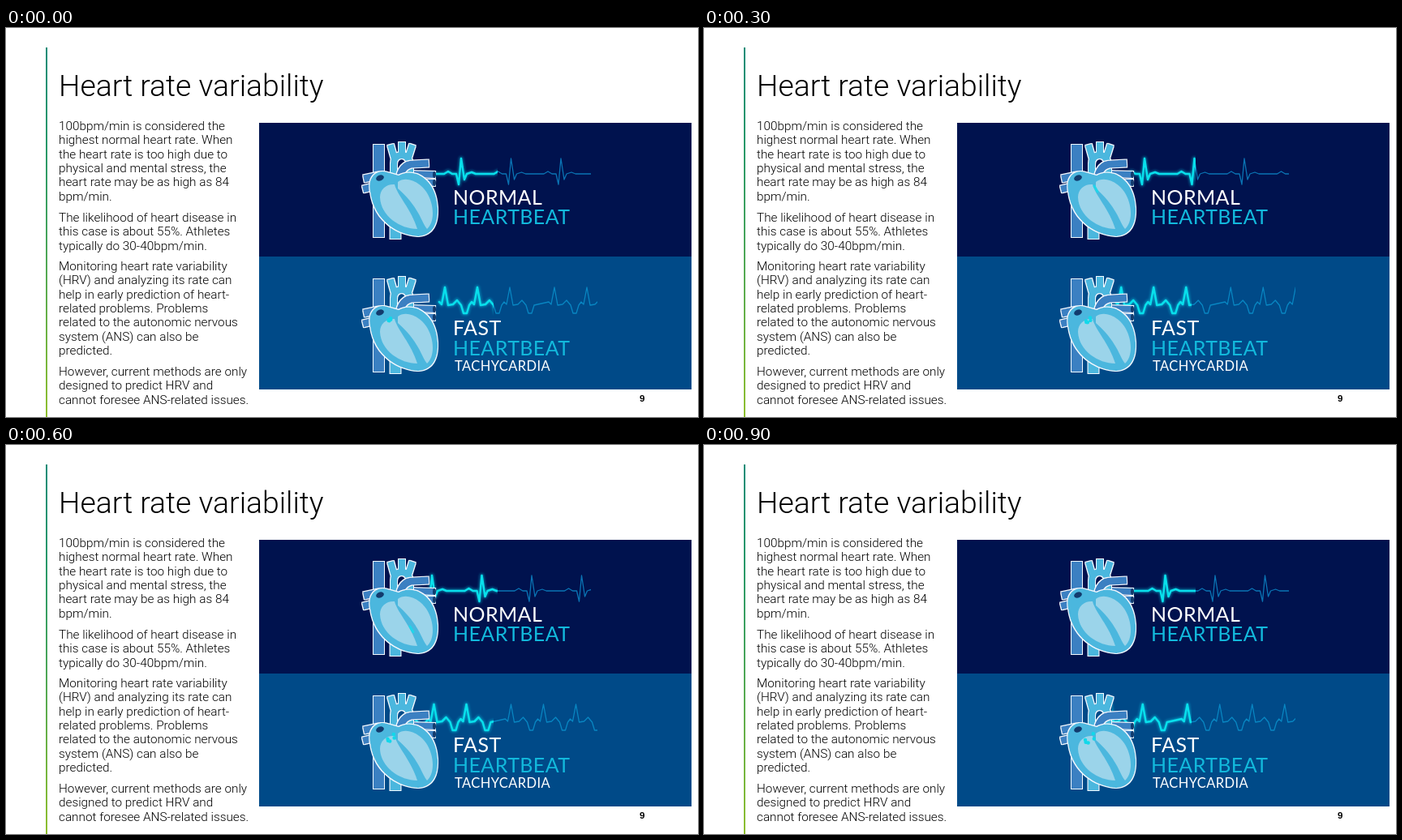
Recreate the animation shown at these times as an HTML page. Size 853 by 480 pixels, loop 960 ms.

```html
<!DOCTYPE html>
<html lang="en">
<head>
<meta charset="utf-8">
<title>Heart rate variability</title>
<style>
  html, body { margin: 0; width: 100%; height: 100%; overflow: hidden; background: #fff; }
  svg { display: block; width: 853px; height: 480px; }
  .slide { font-family: Roboto, Inter, sans-serif; font-weight: 300; fill: #000; }
  .label { font-family: Lato, "Open Sans", sans-serif; font-size: 25px; letter-spacing: .4px; fill: #fff; }
  .cyan { fill: #12b9dc; }
  .wave { fill: none; stroke-linejoin: round; stroke-linecap: round; }
  .thin { stroke-width: 1.3; }
  .bright { stroke: #08e0ec; stroke-width: 2.5; }
  .glow { stroke: #08d8f0; stroke-width: 5; opacity: .45; filter: url(#blur); }
  .parts > * { filter: url(#outline); }
</style>
</head>
<body>
<svg viewBox="0 0 853 480">
  <defs>
    <linearGradient id="rule" x2="0" y2="1">
      <stop stop-color="#088c78"/><stop offset=".5" stop-color="#43a35c"/><stop offset="1" stop-color="#8fbf2e"/>
    </linearGradient>
    <filter id="blur" filterUnits="userSpaceOnUse" x="490" y="140" width="250" height="230">
      <feGaussianBlur stdDeviation="1.8"/>
    </filter>
    <filter id="outline" filterUnits="userSpaceOnUse" x="430" y="130" width="112" height="140">
      <feMorphology in="SourceAlpha" operator="dilate" radius="1.3"/>
      <feComponentTransfer result="edge">
        <feFuncR type="linear" slope="0" intercept=".9"/>
        <feFuncG type="linear" slope="0" intercept=".96"/>
        <feFuncB type="linear" slope="0" intercept="1"/>
      </feComponentTransfer>
      <feMerge><feMergeNode in="edge"/><feMergeNode in="SourceGraphic"/></feMerge>
    </filter>
    <clipPath id="normalThin"><path d="M515 150H721V200H515Z"/></clipPath>
    <clipPath id="normalBright"><path d="M515 150H606V200H515Z"/></clipPath>
    <clipPath id="fastThin"><path d="M503 310H729V360H503Z"/></clipPath>
    <clipPath id="fastBright"><path d="M503 310H601V360H503Z"/></clipPath>
    <g id="heart">
      <g class="parts" fill="none">
        <path d="M459.500 144V258" stroke="#3a80c2" stroke-width="13"/>
        <path d="M480 240V260" stroke="#4bb7de" stroke-width="13"/>
        <path d="M441 186L460 182M440 199L456 195" stroke="#3a80c2" stroke-width="9"/>
        <path d="M500 180L529 181M500 190L529 191" stroke="#3a80c2" stroke-width="8"/>
        <path d="M478 190V168Q478 157 488 157Q498 157 498 172V188M479 162L474 144M488 158V141M496 160L501 144"
              stroke="#4bb7de" stroke-width="8"/>
        <path d="M484 190Q487 168 502 168L521 167" stroke="#3a80c2" stroke-width="9"/>
        <path d="M449 202C445 184 457 174 470 178L484 182Q494 176 506 180C522 186 531 202 532 222C533 244 524 256 508 257C486 256 454 240 449 202Z"
              fill="#4bb7de"/>
      </g>
      <g fill="#9bd4ea">
        <path d="M461 209C461 198 470 192 479 193C482 206 500 224 507 248C486 248 462 232 461 209Z"/>
        <path d="M483 190C492 183 508 188 518 202C528 217 529 239 519 248C511 238 510 222 483 198Z"/>
      </g>
      <g fill="#123b6d">
        <ellipse cx="461" cy="185" rx="5" ry="3.500" transform="rotate(-20 461 185)"/>
        <ellipse cx="528" cy="181" rx="2" ry="4"/><ellipse cx="528" cy="191" rx="2" ry="4"/>
      </g>
    </g>
  </defs>

  <rect width="853" height="480" fill="#fff"/>
  <rect x="49" y="24" width="2" height="456" fill="url(#rule)"/>
  <g class="slide">
    <text x="65" y="84" font-size="37.3">Heart rate variability</text>
    <g id="copy" font-size="15.3"></g>
  </g>
  <text x="781" y="461" font-family="Arial, 'Liberation Sans', sans-serif" font-size="11.500" font-weight="700">9</text>

  <rect x="312" y="117" width="533" height="165" fill="#00124e"/>
  <rect x="312" y="282" width="533" height="164" fill="#004a88"/>
  <g clip-path="url(#normalThin)"><path class="wave thin normal" stroke="#0a74b4"/></g>
  <g clip-path="url(#normalBright)"><path class="wave glow normal"/><path class="wave bright normal"/></g>
  <g clip-path="url(#fastThin)"><path class="wave thin fast" stroke="#0886c2"/></g>
  <g clip-path="url(#fastBright)"><path class="wave glow fast"/><path class="wave bright fast"/></g>
  <use href="#heart"/>
  <use href="#heart" y="166"/>
  <path id="pulse" fill="none" stroke="#1fd6ea" stroke-width="3" stroke-linecap="round"/>
  <path id="dots" fill="none" stroke="#12d8ea" stroke-width="4.500" stroke-linecap="round"/>

  <g class="label">
    <text x="551" y="218">NORMAL</text>
    <text x="551" y="242" class="cyan">HEARTBEAT</text>
    <text x="551" y="379" font-size="25">FAST</text>
    <text x="551" y="404" class="cyan">HEARTBEAT</text>
    <text x="553" y="423" style="font-size:16.500px">TACHYCARDIA</text>
  </g>
</svg>
<script>
const paragraphs = [
  [126, '100bpm/min is considered the|highest normal heart rate. When|the heart rate is too high due to|physical and mental stress, the|heart rate may be as high as 84|bpm/min.'],
  [239, 'The likelihood of heart disease in|this case is about 55%. Athletes|typically do 30-40bpm/min.'],
  [299, 'Monitoring heart rate variability|(HRV) and analyzing its rate can|help in early prediction of heart-|related problems. Problems|related to the autonomic nervous|system (ANS) can also be|predicted.'],
  [429, 'However, current methods are only|designed to predict HRV and|cannot foresee ANS-related issues.']
];
document.getElementById('copy').innerHTML = paragraphs.map(([y, text]) =>
  text.split('|').map((line, i) => `<text x="65" y="${y + i * 17.35}">${line}</text>`).join('')).join('');

// Beat outlines: x relative to the peak, absolute y.
const normalBeat = [[-21, 180], [-16, 177], [-11, 180], [-6, 180], [-3, 193], [0, 161], [4, 187], [7, 180], [13, 178], [18, 180]];
const fastBeat = [[-7, 338], [-4, 341], [0, 320], [4, 342], [10, 341], [15, 336], [20, 342], [23, 352], [27, 352], [30, 342]];
const normalPeaks = [-1, 0, 1, 2, 3, 4].map(i => 561 + 61.5 * i);
const fastPeaks = [541, 581, 621, 676, 716, 756, 796];
const particles = [[511, 345], [516, 376], [465, 398], [462, 384], [480, 402]];

const line = points => 'M' + points.map(p => p.join(' ')).join('L');
const wave = (peaks, beat, shift) =>
  line(peaks.flatMap(peak => beat.map(([x, y]) => [peak - shift + x, y])));
const setPath = (selector, d) =>
  document.querySelectorAll(selector).forEach(el => el.setAttribute('d', d));

function draw() {
  const step = Math.floor(performance.now() % 960 / 60);
  setPath('.normal', wave(normalPeaks, normalBeat, 3.6 * step));
  setPath('.fast', wave(fastPeaks, fastBeat, 5.35 * step));

  // Sparks spread from the node over the lower heart.
  const spread = (.05 + .21 * step) % 1;
  setPath('#dots', particles.map(([x, y]) =>
    `M${472 + (x - 472) * spread} ${359 + (y - 359) * spread}h.01`).join(''));

  // A signal runs down the septum of the upper heart.
  const p = (step - 5) / 8;
  setPath('#pulse', p >= 0 && p <= 1
    ? line([[481 + 27 * p, 195 + 46 * p], [485 + 27 * p, 202 + 46 * p]]) : '');
  requestAnimationFrame(draw);
}
draw();
</script>
</body>
</html>
```
